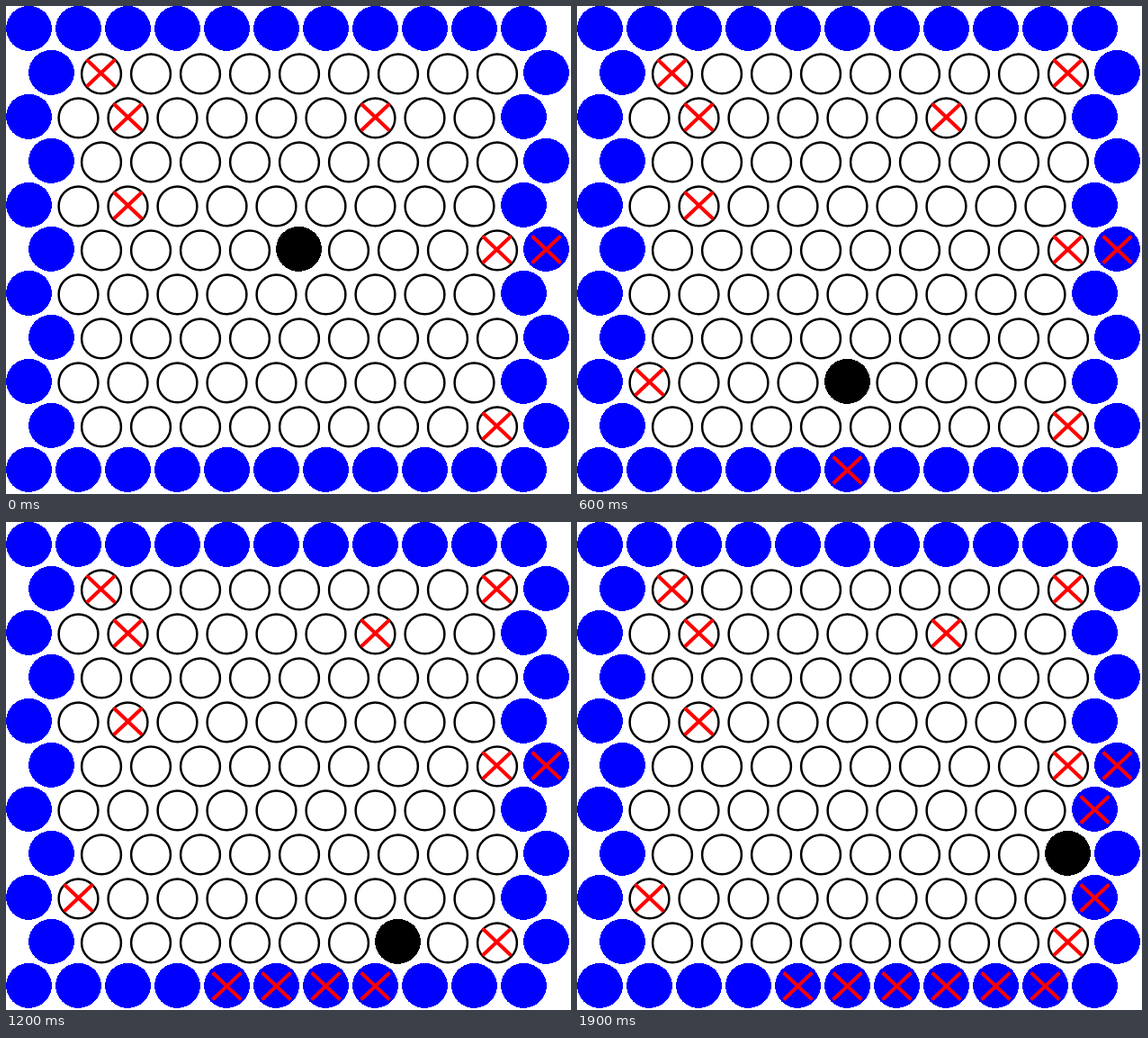
Animation of 628x542 px, one loop 2 s. Source, as an HTML page:

```html
<!DOCTYPE html>
<html lang="en">
<head>
<meta charset="utf-8">
<title>Hex board chase</title>
<style>
  html, body { margin: 0; width: 100%; height: 100%; overflow: hidden; background: #fff; }
  svg { display: block; width: 628px; height: 542px; }
  .disc { shape-rendering: crispEdges; }
  .edge { fill: #00f; }
  .cat { fill: #000; }
  .open { fill: none; stroke: #000; stroke-width: 2.5; }
  .cross { fill: none; stroke: #f00; stroke-width: 4; }
</style>
</head>
<body>
<svg id="board" viewBox="0 0 628 542"></svg>
<script>
const SIZE = 11, LAST = SIZE - 1, STEP = 100, LOOP = 2000, TURNS = 10;
const board = document.getElementById('board');

// Cells are [row, column]; odd rows are shifted half a cell to the right.
const run = ([row, col], count, [down, right]) =>
  Array.from({ length: count }, (_, i) => [row + i * down, col + i * right]);

const startMarks = [
  [1, 1], [2, 7], [9, 9],
  ...run([2, 2], 2, [2, 0]),
  ...run([5, 9], 2, [0, 1])
];

// Two corners first, then the bottom edge under the cat, then the right edge.
const newMarks = [
  [1, 9], [8, 1],
  ...run([LAST, 5], 2, [0, -1]),
  ...run([LAST, 6], 4, [0, 1]),
  ...run([8, LAST], 2, [-2, 0])
];

// The cat walks down, along the bottom, and back up at the right.
const catPath = Array.from({ length: TURNS }, (_, i) =>
  [Math.min(5 + i, 9, 16 - i), Math.min(Math.max(i + 1, 5), 9)]);

const origin = ([row, col], shift = 25) => [row % 2 * shift + col * 55, row * 49];

function add(tag, attrs) {
  const node = document.createElementNS('http://www.w3.org/2000/svg', tag);
  for (const name in attrs) node.setAttribute(name, attrs[name]);
  return board.appendChild(node);
}

function addDisc(cell, kind) {
  const [x, y] = origin(cell);
  return add('ellipse', { class: 'disc ' + kind, cx: x + 25.5, cy: y + 24.9, rx: 25.4, ry: 25 });
}

function addOpen(cell) {
  const [x, y] = origin(cell, 25.5);
  return add('circle', { class: 'open', cx: x + 25.5, cy: y + 26.4, r: 21.9 });
}

function addCross(cell) {
  const [x, y] = origin(cell);
  return add('path', { class: 'cross', d: `M${x + 9.6} ${y + 10.5}l31.8 30m0 -30l-31.8 30` });
}

const open = {};
for (let row = 0; row < SIZE; row++) {
  for (let col = 0; col < SIZE; col++) {
    const cell = [row, col];
    if (row % LAST === 0 || col % LAST === 0) addDisc(cell, 'edge');
    else open[cell] = addOpen(cell);
  }
}
startMarks.forEach(addCross);
const crosses = newMarks.map(addCross);
const cats = catPath.map(cell => addDisc(cell, 'cat'));

const show = (node, on) => node.style.visibility = on ? 'visible' : 'hidden';

// Turns alternate: a cross is placed, then the cat moves.
function render(step) {
  const turn = Math.floor(step / 2);
  crosses.forEach((node, i) => show(node, step > i * 2));
  cats.forEach((node, i) => {
    show(node, i === turn);
    show(open[catPath[i]], i !== turn);
  });
}

let shown = -1;
function tick() {
  const step = Math.floor(performance.now() % LOOP / STEP);
  if (step !== shown) render(shown = step);
  requestAnimationFrame(tick);
}
tick();
</script>
</body>
</html>
```
